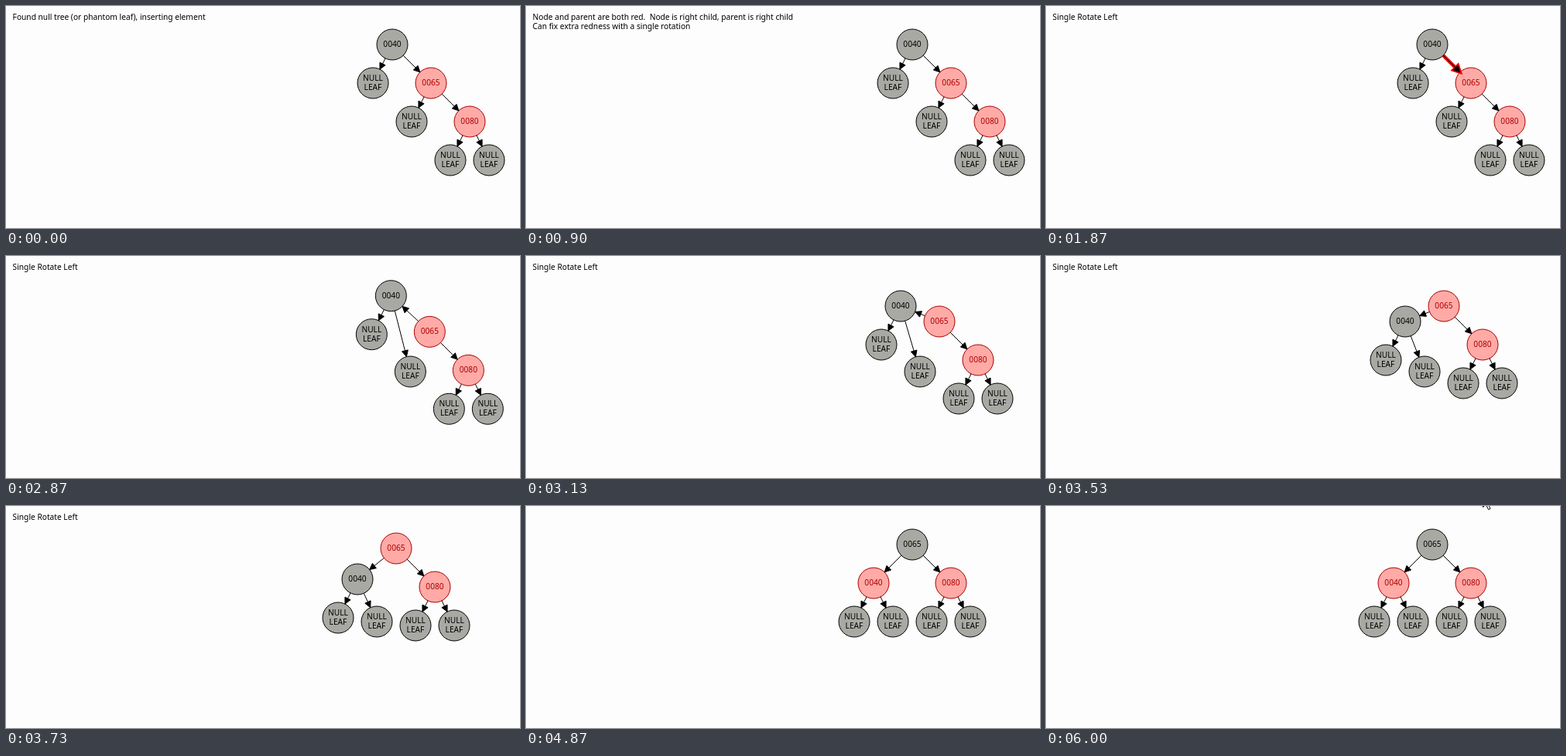
Recreate the animation shown at these times as an HTML page with a canvas. Size 664 px wide and 288 px high, loop 6230 ms.

```html
<!DOCTYPE html>
<html lang="en">
<head>
<meta charset="utf-8">
<title>Red-black tree: single rotation</title>
<style>
html, body { margin: 0; width: 100%; height: 100%; overflow: hidden; background: #fdfdfd; }
canvas { display: block; }
</style>
</head>
<body>
<canvas id="stage" width="664" height="288"></canvas>
<script>
const ctx = document.getElementById('stage').getContext('2d');
const LOOP = 6230, TICK = 100 / 3, R = 20;
const BG = '#fdfdfd';
const BLACK = { line: '#000000', fill: '#a9a9a4' };
const RED = { line: '#aa0000', fill: '#ffaaa6' };

// Ticks at which the steps of the algorithm begin
const EXPLAIN = 25, HIGHLIGHT = 56, ROTATE = 85, DONE = 116;
// The rotation advances in 60 equal steps, one per screen refresh
const MOVE_START = 2837, REFRESH = 16.6, STEPS = 60;

const LEAF = ['NULL', 'LEAF'];
// Each node: label, start position, end position
const nodes = {
  a: [['0040'], 499, 50, 449, 100],
  b: [['0065'], 549, 100, 499, 50],
  c: [['0080'], 599, 150, 549, 100],
  aLeft: [LEAF, 474, 100, 424, 150],
  inner: [LEAF, 524, 150, 474, 150],
  cLeft: [LEAF, 574, 200, 524, 150],
  cRight: [LEAF, 624, 200, 574, 150]
};
const shared = [['a', 'aLeft'], ['b', 'c'], ['c', 'cLeft'], ['c', 'cRight']];
const before = [...shared, ['a', 'b'], ['b', 'inner']];
const after = [...shared, ['b', 'a'], ['a', 'inner']];

const clamp = (v, lo, hi) => Math.min(hi, Math.max(lo, v));

function drawLines(lines, x, y, align, color) {
  ctx.font = '10.2px "Noto Sans", "Open Sans", sans-serif';
  ctx.textBaseline = 'middle';
  ctx.textAlign = align;
  ctx.fillStyle = color;
  lines.forEach((s, i) => ctx.fillText(s, x, y + 12 * i));
}

function drawNode(lines, { x, y }, style) {
  ctx.beginPath();
  ctx.arc(x, y, R, 0, 2 * Math.PI);
  ctx.fillStyle = style.fill;
  ctx.fill();
  ctx.lineWidth = 1;
  ctx.strokeStyle = style.line;
  ctx.stroke();
  drawLines(lines, x, y - 6 * (lines.length - 1), 'center', style.line);
}

function drawArrow(from, to, width, color) {
  const dx = to.x - from.x, dy = to.y - from.y, d = Math.hypot(dx, dy);
  const ux = dx / d, uy = dy / d;
  const tx = to.x - ux * R, ty = to.y - uy * R;
  ctx.lineWidth = width;
  ctx.strokeStyle = ctx.fillStyle = color;
  ctx.beginPath();
  ctx.moveTo(from.x + ux * R, from.y + uy * R);
  ctx.lineTo(tx, ty);
  ctx.stroke();
  ctx.beginPath();
  ctx.moveTo(tx, ty);
  ctx.lineTo(tx - ux * 8 + uy * 4, ty - uy * 8 - ux * 4);
  ctx.lineTo(tx - ux * 8 - uy * 4, ty - uy * 8 + ux * 4);
  ctx.closePath();
  ctx.stroke();
  ctx.fill();
}

function message(n) {
  if (n < EXPLAIN) return ['Found null tree (or phantom leaf), inserting element'];
  if (n < HIGHLIGHT) return [
    'Node and parent are both red.  Node is right child, parent is right child',
    'Can fix extra redness with a single rotation'
  ];
  return n < DONE ? ['Single Rotate Left'] : [];
}

// Triangle wave between 3 and 7
const pulse = n => 7 - Math.abs((n - HIGHLIGHT) / 7 - 2.6);

function progress(n) {
  const shown = Math.round(n * TICK / 10) * 10;
  return clamp(Math.ceil((shown - MOVE_START) / REFRESH) / STEPS, 0, 1);
}

function drawCursor(n) {
  if (n < 153) return;
  const enter = clamp((n - 152) / 6, 0, 1);
  const x = 556 + 5 * enter + 2 * clamp((n - 167) / 4, 0, 1) + (n >= 180 ? 1 : 0);
  const y = -17 + 3 * enter;
  const outline = [[0, 0], [0, 16], [4, 12.5], [7, 19], [9.5, 18], [6.7, 11.5], [11.5, 11.5]];
  ctx.beginPath();
  outline.forEach(([px, py]) => ctx.lineTo(x + px + 0.5, y + py - 0.5));
  ctx.closePath();
  ctx.fillStyle = '#ffffff';
  ctx.fill();
  ctx.lineWidth = 1;
  ctx.strokeStyle = '#000000';
  ctx.stroke();
}

function draw(t) {
  const n = Math.floor((t + 5) / TICK);
  const p = progress(n);
  const done = n >= DONE;
  const pos = {};

  ctx.fillStyle = BG;
  ctx.fillRect(0, 0, 664, 288);
  drawLines(message(n), 8.6, 15, 'left', '#000000');

  for (const [id, [lines, x0, y0, x1, y1]] of Object.entries(nodes)) {
    pos[id] = { x: x0 + (x1 - x0) * p, y: y0 + (y1 - y0) * p };
    const red = id === 'c' || id === (done ? 'a' : 'b');
    drawNode(lines, pos[id], red ? RED : BLACK);
  }
  if (n >= HIGHLIGHT && n < ROTATE) drawArrow(pos.a, pos.b, pulse(n), '#ff0000');
  for (const [from, to] of n < ROTATE ? before : after) {
    drawArrow(pos[from], pos[to], 1, '#000000');
  }
  drawCursor(n);
}

const start = performance.now();
function frame() {
  draw((performance.now() - start) % LOOP);
  requestAnimationFrame(frame);
}
frame();
</script>
</body>
</html>
```
